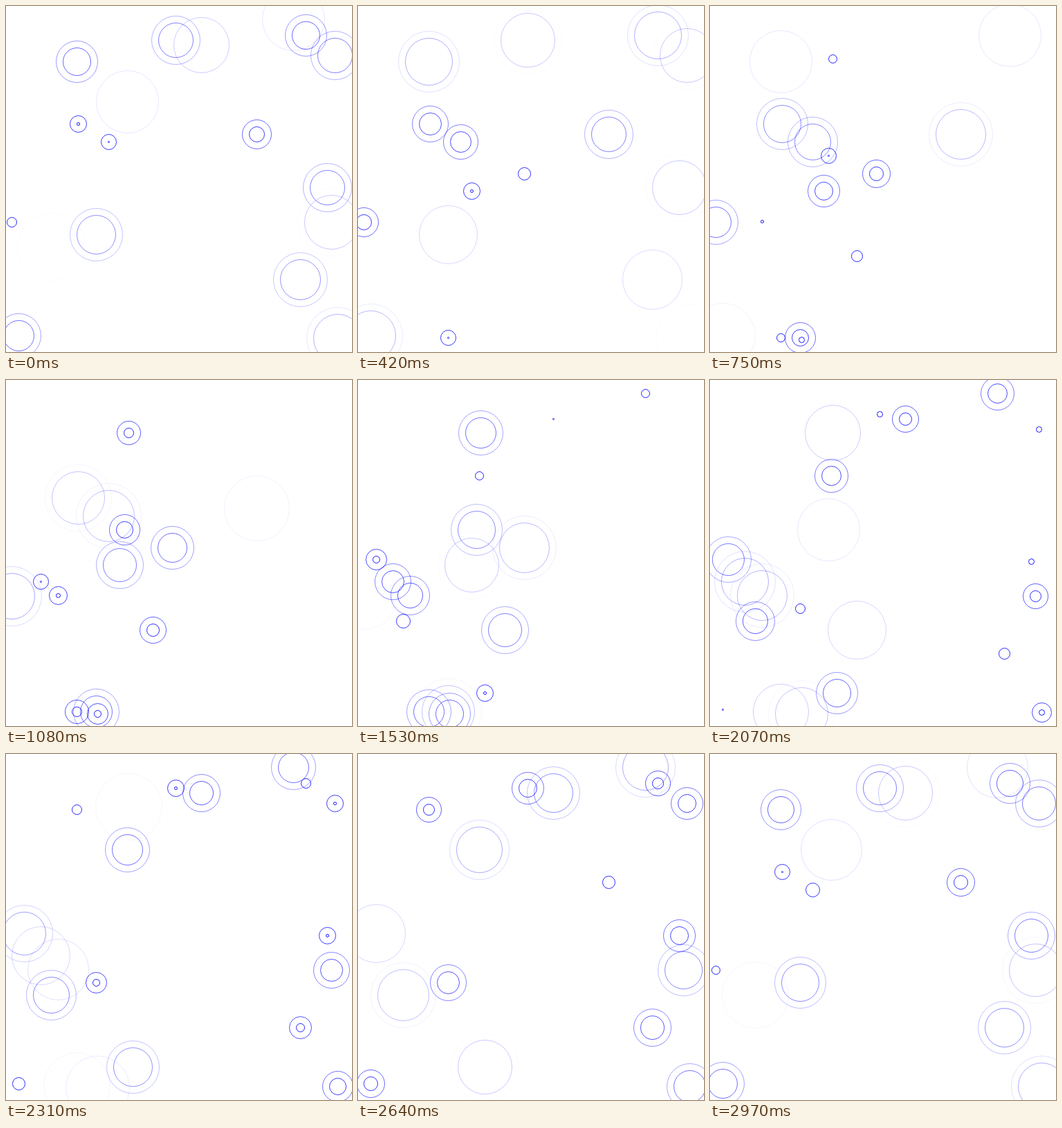
An HTML page with a canvas for the animation above (3030 ms loop, 500x500 px).

```html
<!DOCTYPE html>
<html>
<head>
<meta charset="utf-8">
<title>Ripples</title>
<style>
html, body { margin: 0; width: 100%; height: 100%; overflow: hidden; background: #fff; }
canvas { display: block; }
</style>
</head>
<body>
<canvas id="stage" width="500" height="500"></canvas>
<script>
const ctx = document.getElementById('stage').getContext('2d');
const STEP = 30, LOOP = 3030, STEPS = 100;
const MAX_RADIUS = 50, RING_GAP = 10;

// Each drop: x, y, step at which it lands
const drops = [
  [164, 267, 2], [130, 479, 3], [240, 242, 5], [171, 216, 14], [212, 361, 17],
  [177, 76, 19], [102, 479, 19], [132, 482, 21], [75, 311, 23], [50, 291, 25],
  [26, 259, 36], [183, 452, 39], [65, 348, 41], [415, 19, 45], [175, 138, 45],
  [282, 56, 50], [470, 312, 51], [479, 480, 55], [425, 395, 61], [130, 330, 62],
  [245, 49, 65], [475, 71, 65], [464, 262, 65], [18, 476, 68], [102, 80, 70],
  [433, 42, 70], [362, 185, 79], [104, 170, 88], [148, 196, 89], [8, 312, 93]
];

function ring(x, y, r) {
  if (r <= 0 || r >= MAX_RADIUS) return;
  ctx.strokeStyle = `rgba(0, 0, 255, ${1 - r / MAX_RADIUS})`;
  ctx.beginPath();
  ctx.arc(x + 0.5, y + 0.5, r, 0, Math.PI * 2);
  ctx.stroke();
}

function draw(now) {
  // The last step is held for twice as long
  const step = Math.min(STEPS - 1, Math.floor(now % LOOP / STEP));
  ctx.clearRect(0, 0, 500, 500);
  for (const [x, y, start] of drops) {
    const age = (step - start + STEPS) % STEPS;
    ring(x, y, age);
    ring(x, y, age - RING_GAP);
  }
}

const startTime = performance.now();
function tick() {
  draw(performance.now() - startTime);
  requestAnimationFrame(tick);
}
tick();
</script>
</body>
</html>
```
